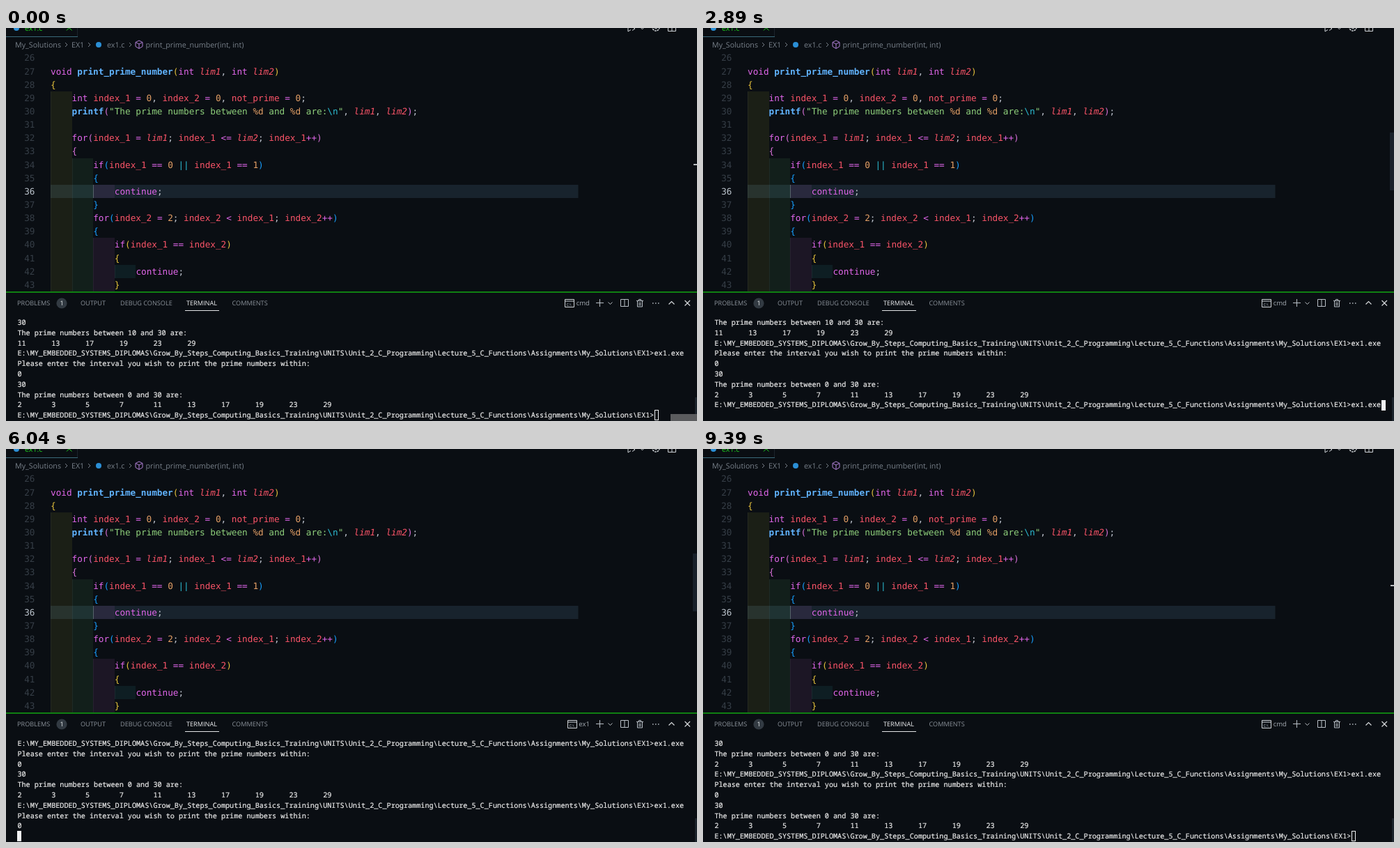
These frames come from a looping animation (992 by 564 pixels, 9.47 s). An HTML page:

```html
<!DOCTYPE html>
<html lang="en">
<head>
<meta charset="utf-8">
<title>Prime numbers in the terminal</title>
<style>
html, body { margin: 0; width: 100%; height: 100%; overflow: hidden; background: #0a0e13; }
svg { display: block; width: 100%; height: 100%; }
text { white-space: pre; text-rendering: geometricPrecision; }
.ui { font-family: "Open Sans", "Noto Sans", sans-serif; font-size: 10.7px; fill: #78808a; }
.tab { font-size: 9.15px; fill: #8b929a; }
.on { fill: #f0f2f4; }
.code { font: 12.7px "DejaVu Sans Mono", monospace; fill: #c0c6d0; }
.num { fill: #363e47; text-anchor: end; }
.term { font: 10.167px "Noto Sans Mono", "DejaVu Sans Mono", monospace; fill: #ececec; stroke: #ececec; stroke-width: .2; }
.icon { fill: none; stroke: #b8bfc6; stroke-width: 1; }
.key { fill: #e066ea; }
.fn { fill: #61b4ff; font-weight: bold; }
.var { fill: #fb5468; }
.arg { fill: #fb5468; font-style: italic; }
.lit { fill: #e5a066; }
.str { fill: #8fd07c; }
.esc { fill: #2bbad0; }
.b0 { fill: #e5c13c; }
.b1 { fill: #d670d6; }
.b2 { fill: #179fff; }
</style>
</head>
<body>
<svg viewBox="0 0 992 564" preserveAspectRatio="none">
  <!-- editor tab, breadcrumb and toolbar -->
  <path d="M0 12.500H103" stroke="#3a6a7a"/>
  <path d="M102.500 0V12" stroke="#1c242c"/>
  <circle cx="15" cy="0" r="4" fill="#2b8fd6"/>
  <text class="ui" x="27" y="4" style="fill:#1fd01f">ex1.c</text>
  <path d="M87 -4L94.500 3.500M94.500 -4L87 3.500" stroke="#1fd01f"/>
  <text class="ui" x="13" y="27.500">My_Solutions</text>
  <text class="ui" x="94" y="27.500">EX1</text>
  <circle cx="133" cy="24" r="4" fill="#2b8fd6"/>
  <text class="ui" x="145" y="27.500">ex1.c</text>
  <text class="ui" x="200.500" y="27.500">print_prime_number(int, int)</text>
  <path d="M85 21l3 3-3 3M118 21l3 3-3 3M177 21l3 3-3 3" fill="none" stroke="#78808a"/>
  <path d="M191 18l5 2.500v6l-5 3-5-3v-6zM186 20.500l5 2.500 5-2.500M191 23v6" fill="none" stroke="#b180d7"/>
  <g class="icon" style="stroke:#d0d4d8">
    <path d="M893 0V5L897 2.500M898 -2L903 1L899 3.500M911.500 0l2 1.500 2-1.500"/>
    <circle cx="933" cy="-1" r="5" stroke-width="1.600" stroke-dasharray="2.500 1"/>
    <circle cx="933" cy="-1" r="2"/>
    <path d="M950.500 0V4.500H961.500V0M956 0V4.500"/>
  </g>

  <g id="editor"></g>
  <rect x="987" y="195" width="5" height="2" fill="#b8bcc0"/>
  <rect id="slider" x="986" y="150" width="6" height="83" fill="#18202a"/>

  <!-- panel header -->
  <rect y="378.300" width="992" height="1.500" fill="#12a512"/>
  <g class="ui">
    <text class="tab" x="16" y="398.300">PROBLEMS</text>
    <circle cx="80" cy="395" r="7.600" fill="#323a42"/>
    <text class="tab on" x="80" y="398.300" text-anchor="middle">1</text>
    <text class="tab" x="107" y="398.300">OUTPUT</text>
    <text class="tab" x="164" y="398.300">DEBUG CONSOLE</text>
    <text class="tab on" x="259" y="398.300">TERMINAL</text>
    <text class="tab" x="324.500" y="398.300">COMMENTS</text>
  </g>
  <path d="M257 405.500H306" stroke="#e4e6e8"/>
  <g id="shell">
    <path class="icon" d="M.5 -5.500h13v11h-13zM.5 -3h13" style="stroke:#d0d4d8"/>
    <text class="ui" x="2.500" y="4" style="font-size:5.500px;fill:#d0d4d8">C:\</text>
  </g>
  <text id="label" class="ui" x="838" y="398.300" text-anchor="end" style="font-size:9.600px;fill:#a3aab1"></text>
  <g class="icon">
    <path d="M847 394.500h11M852.500 389v11M864.500 393.500l3 3 3-3"/>
    <path d="M882.500 389.500h11v10h-11zM888 389.500v10"/>
    <path d="M905 391.500h10M908.500 391v-1.500h3v1.500M906.500 392v8h7v-8M909 393.500v5M911 393.500v5"/>
    <path d="M928 395h1.500M932 395h1.500M936 395h1.500" stroke-width="1.500"/>
    <path d="M951.500 396.500l4-4 4 4M974.500 391l7.500 7.500M982 391l-7.500 7.500" stroke="#d5d8db" stroke-width="1.200"/>
  </g>

  <!-- terminal -->
  <rect x="989" y="530" width="3" height="34" fill="#1b232b"/>
  <g id="rows"></g>
  <rect id="caret"/>
  <rect id="hint" x="954" y="554" width="38" height="10" fill="#5b5c5e"/>
</svg>
<script>
const LOOP = 9470;
const get = id => document.getElementById(id);
const esc = s => s.replace(/&/g, '&amp;').replace(/</g, '&lt;').replace(/>/g, '&gt;');

// Editor
const LEFT = 64, ROW = 19.14, INDENT = 30.6;
const rowTop = n => Math.round(224.8 + (n - 36) * ROW);
const colLeft = c => Math.round(LEFT + c * INDENT);
const source = [
  '',
  'void print_prime_number(int lim1, int lim2)',
  '{',
  '    int index_1 = 0, index_2 = 0, not_prime = 0;',
  '    printf("The prime numbers between %d and %d are:\\n", lim1, lim2);',
  '',
  '    for(index_1 = lim1; index_1 <= lim2; index_1++)',
  '    {',
  '        if(index_1 == 0 || index_1 == 1)',
  '        {',
  '            continue;',
  '        }',
  '        for(index_2 = 2; index_2 < index_1; index_2++)',
  '        {',
  '            if(index_1 == index_2)',
  '            {',
  '                continue;',
  '            }'
];
const rules = [
  ['key', /^(void|int|for|if|continue|[=<+]+)$/],
  ['fn', /^print/],
  ['arg', /^lim/],
  ['var', /^(index|not)/],
  ['lit', /^(\d+|%d)$/],
  ['esc', /^(\|\||\\n)$/]
];
let depth = 0, quoted = false;

function paint(token) {
  let name;
  if (/[({]/.test(token)) name = 'b' + depth++ % 3;
  else if (/[)}]/.test(token)) name = 'b' + --depth % 3;
  else if (token === '"') { quoted = !quoted; name = 'str'; }
  else if (quoted) name = token === '%d' ? 'lit' : token === '\\n' ? 'esc' : 'str';
  else name = (rules.find(r => r[1].test(token)) || [''])[0];
  return `<tspan class="${name}">${esc(token)}</tspan>`;
}

// tinted indent with a faint guide on its left edge
const block = (col, from, to, fill, guide = 'rgba(255,255,255,.05)') => {
  const x = colLeft(col), y = rowTop(from), height = Math.min(rowTop(to + 1), 378) - y;
  return `<rect x="${x}" y="${y}" width="${colLeft(col + 1) - x}" height="${height}" fill="${fill}"/>` +
    `<rect x="${x}" y="${y}" width="1" height="${height}" fill="${guide}"/>`;
};
const olive = 'rgba(255,255,64,.07)', green = 'rgba(127,255,127,.07)',
  purple = 'rgba(255,127,255,.075)', teal = 'rgba(79,236,236,.07)';

get('editor').innerHTML =
  `<rect x="${LEFT}" y="${rowTop(36)}" width="757.5" height="${rowTop(37) - rowTop(36)}" fill="#18232d"/>` +
  block(0, 29, 43, olive) + block(1, 34, 43, green) + block(2, 36, 36, purple, '#56616a') +
  block(2, 40, 43, purple) + block(3, 42, 42, teal) +
  source.map((line, i) => {
    const n = 26 + i, y = rowTop(n) + 14, code = line.trimStart();
    const x = LEFT + (line.length - code.length) / 4 * INDENT;
    const tokens = code.match(/%d|\\n|\w+|\|\||[=<+]+|\s+|./g) || [];
    return `<text class="code num" x="41.500" y="${y}"${n === 36 ? ' style="fill:#bcc4cd"' : ''}>${n}</text>` +
      `<text class="code" x="${x}" y="${y}">${tokens.map(paint).join('')}</text>`;
  }).join('');

// Terminal
const CELL = 6.1, LINE = 14.8, TOP = 415.2, EDGE = 16.4;
const prompt = 'E:\\MY_EMBEDDED_SYSTEMS_DIPLOMAS\\Grow_By_Steps_Computing_Basics_Training\\UNITS\\' +
  'Unit_2_C_Programming\\Lecture_5_C_Functions\\Assignments\\My_Solutions\\EX1>';
const run = prompt + 'ex1.exe';
const ask = 'Please enter the interval you wish to print the prime numbers within:';
const title = from => `The prime numbers between ${from} and 30 are:`;
const primes = from => [2, 3, 5, 7, 11, 13, 17, 19, 23, 29]
  .filter(p => p >= from).map(p => String(p).padEnd(8)).join('');
const session = [run, ask, '0', '30', title(0), primes(0)];
const log = ['30', title(10), primes(10), ...session, ...session, prompt];

// start time, first visible line, caret line, typed text
const steps = [
  [0, 0, 9, ''], [2160, 0, 9, 'ex1.exe'], [2360, 1, 10, ''], [2890, 1, 9, 'ex1.exe'],
  [3310, 2, 11, ''], [5310, 2, 11, '0'], [6040, 3, 12, ''], [6370, 3, 12, '3'],
  [6570, 3, 12, '30'], [6970, 6, 15, '']
];
let shown;

function drawTerminal(step) {
  const [, first, last, typed] = step;
  const current = (log[last].startsWith(prompt) ? prompt : '') + typed;
  // while the caret rests below a launched command, that command stays in view
  get('rows').innerHTML = [...log.slice(first, last), current].map((line, i) =>
    `<text class="term" x="${EDGE}" y="${Math.round(TOP + i * LINE + 10.8)}">${esc(line)}</text>`).join('');
  get('caret').dataset.x = EDGE + current.length * CELL;
  get('caret').dataset.y = TOP + (last - first) * LINE;
}

function set(id, attrs) {
  for (const name in attrs) get(id).setAttribute(name, attrs[name]);
}

const ramp = (t, a, b) => Math.min(1, Math.max(0, (t - a) / (b - a)));

function frame(now) {
  const t = now % LOOP;
  const step = steps.filter(s => s[0] <= t).pop();
  if (step !== shown) drawTerminal(shown = step);

  const hollow = t < 1360 || t >= 9390, inset = hollow ? .5 : 0;
  const { x, y } = get('caret').dataset;
  set('caret', {
    x: Math.round(x) + inset, y: Math.round(y) + inset,
    width: 6 - 2 * inset, height: 15 - 2 * inset,
    fill: hollow ? 'none' : '#f2f3f4', stroke: hollow ? '#f2f3f4' : 'none'
  });

  const running = t >= 4230 && t < 7900;
  get('label').textContent = running ? 'ex1' : 'cmd';
  set('shell', { transform: `translate(${running ? 806 : 802} 395)` });
  set('slider', {
    opacity: ramp(t, 300, 480) - ramp(t, 720, 1430) + ramp(t, 1560, 1700) - ramp(t, 8500, 9390)
  });
  set('hint', { visibility: t < 70 ? 'visible' : 'hidden' });
  requestAnimationFrame(frame);
}
frame(0);
</script>
</body>
</html>
```
